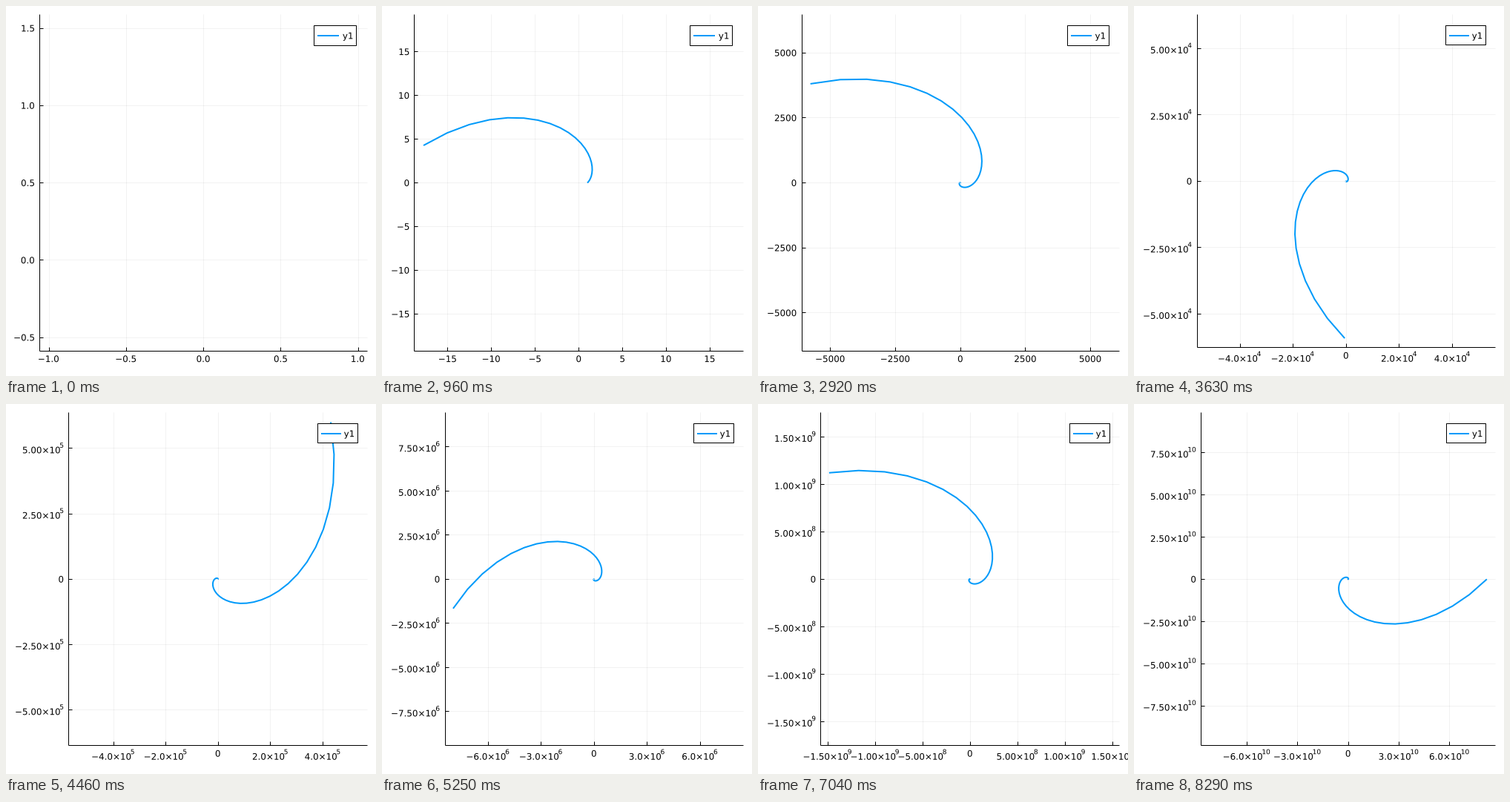
A matplotlib script that plays this animation: 499 px wide and 499 px high, repeating every 8.33 s.

```python
import math

import matplotlib.pyplot as plt
import numpy as np
from matplotlib.animation import FuncAnimation
from matplotlib.collections import LineCollection
from matplotlib.patches import PathPatch, Rectangle
from matplotlib.path import Path
from matplotlib.textpath import TextPath
from matplotlib.transforms import Affine2D

plt.rcParams["font.family"] = "DejaVu Sans"

SIZE, FRAMES, LOOP = 499, 200, 8330
PX = 0.72                      # one pixel in points at 100 dpi
RIGHT, TOP = 487.05, 11.8
SNAP = 0.5                     # makes horizontal hairlines round up the page
EM, SUP_EM = 11.9, 9.0
CAP = 0.729 * EM
BLUE = "#009afa"
NICE = {1: 1.0, 5: 0.9, 2: 0.7, 2.5: 0.5, 3: 0.2}

t = np.linspace(0, 8 * np.pi, FRAMES)
X, Y = np.exp(t) * np.cos(t), np.exp(t) * np.sin(t)

fig = plt.figure(figsize=(SIZE / 100, SIZE / 100), dpi=100, facecolor="white")
ax = fig.add_axes([0, 0, 1, 1])
glyphs = {}


def find_ticks(lo, hi):
    """Pick 4 to 8 round values, weighing count, coverage and niceness."""
    span = hi - lo
    z = math.floor(math.log10(span))
    best, top_score = None, -1
    for e in (z - 1, z):
        for q, nice in NICE.items():
            step = q * 10.0 ** e
            n = np.arange(math.ceil(lo / step), math.floor(hi / step) + 1)
            if not 4 <= len(n) <= 8:
                continue
            count = 1 - abs(len(n) - 5) / 5
            cover = 1.5 * span / ((len(n) - 1) * step)
            score = count / 4 + cover / 3 + nice / 4
            if score > top_score:
                best, top_score = n * step, score
    return best


def decimals(values):
    for d in range(4):
        if all(abs(round(v, d) - v) < 1e-6 for v in values):
            return d
    return 4


def is_sci(values):
    return np.ptp(values) > 1.0001e4


def make_labels(values):
    """Labels as (base, exponent) pairs."""
    if not is_sci(values):
        d = decimals(values)
        return [(f"{v:.{d}f}".replace("-", "−"), "") for v in values]
    exps = [math.floor(math.log10(abs(v)) + 1e-9) if v else 0 for v in values]
    mants = [v / 10.0 ** e for v, e in zip(values, exps)]
    d = decimals(mants) + 1
    return [(f"{m:.{d}f}×10".replace("-", "−"), str(e)) if m else ("0", "")
            for m, e in zip(mants, exps)]


def glyph(label):
    """Outline of a label and its ink extent in x."""
    if label not in glyphs:
        base, sup = label
        path = TextPath((0, 0), base, size=EM)
        if sup:
            # the exponent sits tight against the last zero
            start = path.get_extents().x1 - 0.5
            raised = TextPath((start, 7.5), sup, size=SUP_EM)
            path = Path.make_compound_path(path, raised)
        box = path.get_extents()
        glyphs[label] = path, box.x0, box.x1
    return glyphs[label]


def ink_width(label):
    _, x0, x1 = glyph(label)
    return x1 - x0


def place(label, x, base, align):
    """Outline with the ink start, middle or end (0, 0.5, 1) at x."""
    path, x0, x1 = glyph(label)
    shift = x - x0 - align * (x1 - x0)
    return Affine2D().scale(1, -1).translate(shift, base).transform_path(path)


def layout(i):
    """Symmetric limits with equal scales, and margins that fit the labels."""
    half_x = 1.06 * np.abs(X[:i + 1]).max()
    half_y = 1.06 * np.abs(Y[:i + 1]).max()
    mid_y = 0
    if i == 0:
        half_y, mid_y = 0.53, 0.5
    left, bottom = 50, 465
    for _ in range(3):
        w, h = RIGHT - left, bottom - TOP
        unit = max(2 * half_x / w, 2 * half_y / h)
        xt = find_ticks(-unit * w / 2, unit * w / 2)
        yt = find_ticks(mid_y - unit * h / 2, mid_y + unit * h / 2)
        labels = make_labels(yt) if i else [("0.75", "")]
        left = 20.35 + max(map(ink_width, labels))
        bottom = 460.8 if is_sci(xt) else 465.3
    w, h = RIGHT - left, bottom - TOP
    unit = max(2 * half_x / w, 2 * half_y / h)
    return left, bottom, unit, mid_y, xt, yt


def add_lines(segments, **style):
    segments = [[(x, y - SNAP) for x, y in s] for s in segments]
    ax.add_collection(LineCollection(segments, linewidths=PX, **style),
                      autolim=False)


def add_curve(x, y, z):
    ax.plot(x, y, color=BLUE, lw=2 * PX, solid_capstyle="butt",
            solid_joinstyle="round", zorder=z)


def draw(i):
    ax.clear()
    ax.set_axis_off()
    ax.set_xlim(0, SIZE)
    ax.set_ylim(SIZE, 0)

    left, bottom, unit, mid_y, xt, yt = layout(i)
    w = RIGHT - left

    def sx(x):
        return (left + RIGHT) / 2 + x / unit

    def sy(y):
        return (TOP + bottom) / 2 - (y - mid_y) / unit

    tx, ty = sx(xt), sy(yt)
    add_lines([[(x, TOP), (x, bottom)] for x in tx]
              + [[(left, y), (RIGHT, y)] for y in ty],
              colors=[(0, 0, 0, 0.05)], zorder=1)
    add_lines([[(x, bottom), (x, bottom - 5)] for x in tx]
              + [[(left, y), (left + 5, y)] for y in ty]
              + [[(left, TOP), (left, bottom)], [(left, bottom), (RIGHT, bottom)]],
              colors="black", zorder=2)

    # tick labels
    text = []
    for x, label in zip(tx, make_labels(xt)):
        base = bottom + (18.9 if label[1] else 14.8)
        text.append(place(label, x, base, 0.5))
    for y, label in zip(ty, make_labels(yt)):
        base = y + (6.5 if label[1] else CAP / 2)
        text.append(place(label, left - 7.1, base, 1))

    if i:
        add_curve(sx(X[:i + 1]), sy(Y[:i + 1]), 3)

    # legend, sized in parts of the plot width
    f = w / 45
    name = ("y1", "")
    end = RIGHT - 1.5 * f
    text_x = end - f / 2 - ink_width(name)
    box_x = text_x - 4 * f
    box_y = TOP + (bottom - TOP) / 30
    mid = box_y + 13.1
    ax.add_patch(Rectangle((box_x, box_y - SNAP), end - box_x, 26.2,
                           fc="white", ec="black", lw=PX, zorder=4))
    add_curve([text_x - 3.5 * f, text_x - 0.5 * f], [mid, mid], 5)
    text.append(place(name, text_x, mid + CAP / 2, 0))

    ax.add_patch(PathPatch(Path.make_compound_path(*text),
                           fc="black", lw=0, zorder=6))
    return []


anim = FuncAnimation(fig, draw, frames=FRAMES, interval=LOOP / FRAMES,
                     repeat=True, repeat_delay=0)
plt.show()
```
